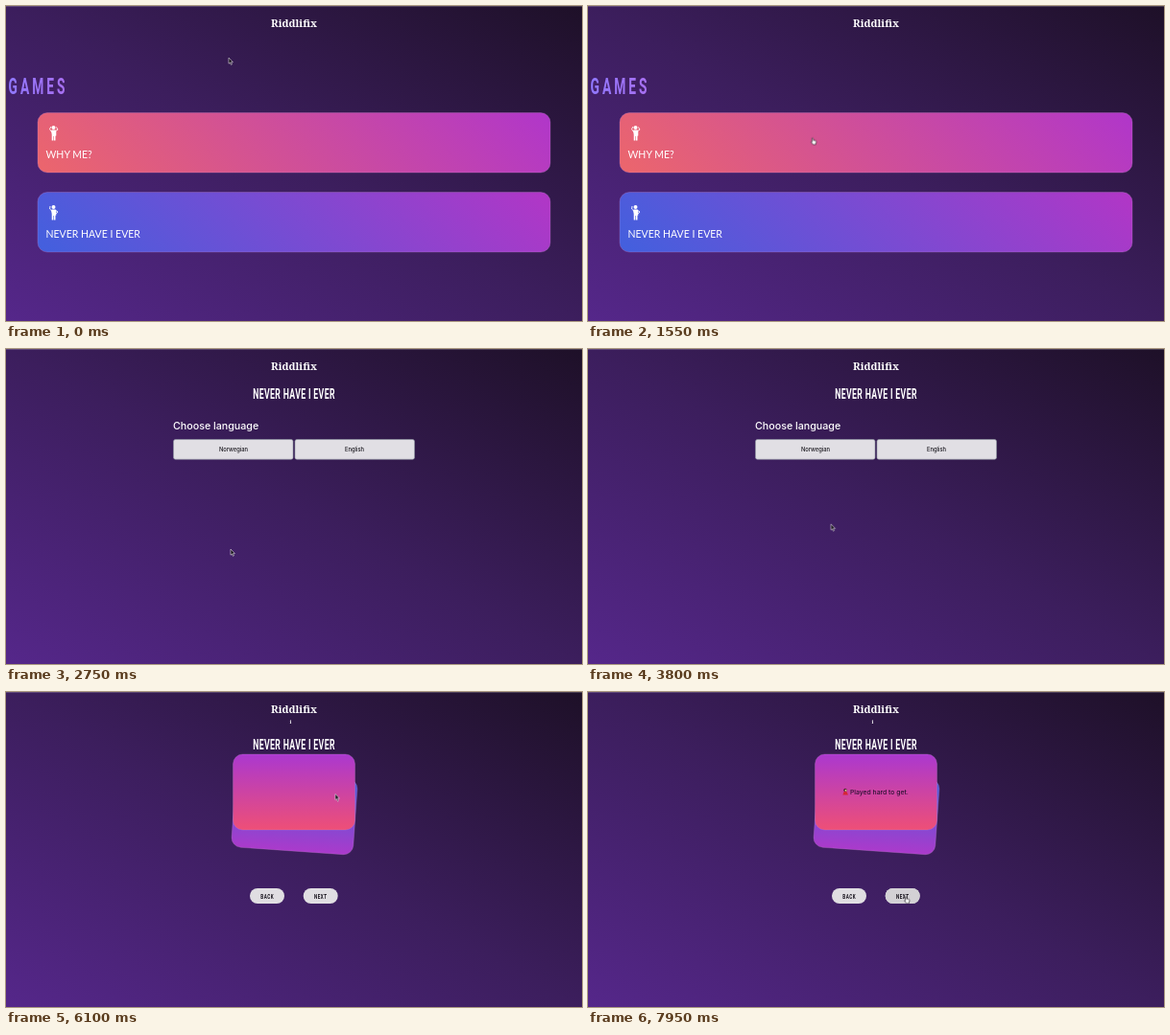
Recreate the animation shown at these times as an HTML page. Size 600 by 329 pixels, loop 8 s.

```html
<!DOCTYPE html>
<html lang="en">
<head>
<meta charset="utf-8">
<title>Party game</title>
<style>
  html, body { margin: 0; width: 100%; height: 100%; overflow: hidden; }
  body { background: linear-gradient(to top right, #55278a, #3c1e5d 50%, #1e1028); }
  svg { display: block; width: 100%; height: 100%; }

  .logo { font: 900 10.8px "Noto Serif", serif; fill: #fff; text-anchor: middle; }
  .tall { font-family: Roboto, sans-serif; font-weight: 700; transform: scaleX(.6); }
  .mid { text-anchor: middle; }
  .heading { font-size: 14.5px; letter-spacing: .6px; fill: #fff; }
  .games { font-size: 23px; letter-spacing: 5px; fill: url(#lilac); }
  .pill-label { font-size: 7.6px; letter-spacing: .8px; fill: #17131c; }
  .game { font: 400 10.5px Lato, sans-serif; fill: #fff; }
  .ask { font: 500 10.7px Inter, sans-serif; fill: #fff; }
  .choice { font: 500 5.8px Inter, sans-serif; fill: #1c1a20; text-anchor: middle; }
  .prompt { font: 500 6.8px Inter, sans-serif; fill: #2a1030; }
  .edge { stroke: #c58bd0; stroke-opacity: .55; stroke-width: .5; }
  .button { fill: #e1dfe4; stroke: #939aa5; stroke-width: .6; }
  .pill { fill: #e0dee2; }

  /* One 8 s timeline: 1% = 80 ms */
  .menu, .language, .play, .answer, .arrow, .hand, .hover-english, .hover-next {
    animation: 8s step-end infinite; visibility: hidden;
  }
  .menu { animation-name: menu; }
  .language { animation-name: language; }
  .play { animation-name: play; }
  .answer { animation-name: answer; }
  .hover-english { animation-name: hover-english; fill: #d3d1d7; }
  .hover-next { animation-name: hover-next; fill: #d3d1d5; }
  .arrow { animation-name: arrow; }
  .hand { animation-name: hand; }
  .pointer { animation: move 8s linear infinite; }

  @keyframes menu { 0% { visibility: visible } 32.5%, 100% { visibility: hidden } }
  @keyframes language { 0%, 72.5%, 100% { visibility: hidden } 32.5% { visibility: visible } }
  @keyframes play { 0% { visibility: hidden } 72.5%, 100% { visibility: visible } }
  @keyframes answer { 0% { visibility: hidden } 93.75%, 100% { visibility: visible } }
  @keyframes hover-english { 0%, 72.5%, 100% { visibility: hidden } 64.4% { visibility: visible } }
  @keyframes hover-next { 0% { visibility: hidden } 88%, 100% { visibility: visible } }
  @keyframes arrow {
    0%, 23.5%, 32.5%, 72.5% { visibility: visible }
    16.2%, 25.2%, 64.4%, 88%, 100% { visibility: hidden }
  }
  @keyframes hand {
    0%, 23.5%, 32.5%, 72.5% { visibility: hidden }
    16.2%, 25.2%, 64.4%, 88%, 100% { visibility: visible }
  }
  @keyframes move {
    0% { transform: translate(232px, 54px) }
    11.25% { transform: translate(231.5px, 83.5px) }
    21.25% { transform: translate(233px, 150px) }
    27.5%, 43% { transform: translate(234px, 209px) }
    53.5% { transform: translate(278.5px, 148px) }
    58.5%, 62% { transform: translate(330px, 115px) }
    68%, 79% { transform: translate(343px, 106.5px) }
    91%, 100% { transform: translate(330px, 213.5px) }
  }
</style>
</head>
<body>
<svg viewBox="0 0 600 329" preserveAspectRatio="none">
  <defs>
    <linearGradient id="lilac"><stop stop-color="#9078ff"/><stop offset="1" stop-color="#a86ff0"/></linearGradient>
    <linearGradient id="coral" gradientUnits="userSpaceOnUse" x1="118" y1="180" x2="416" y2="-118">
      <stop stop-color="#ec666c"/><stop offset="1" stop-color="#b036ca"/>
    </linearGradient>
    <linearGradient id="blue" gradientUnits="userSpaceOnUse" x1="118" y1="180" x2="416" y2="-118">
      <stop stop-color="#4260de"/><stop offset="1" stop-color="#b236c6"/>
    </linearGradient>
    <linearGradient id="front" x2="0" y2="1"><stop stop-color="#ab38cf"/><stop offset="1" stop-color="#ee4f77"/></linearGradient>
    <linearGradient id="back" x2="0" y2="1"><stop stop-color="#4361dd"/><stop offset="1" stop-color="#ab3acb"/></linearGradient>
    <rect id="card" width="534" height="62.5" rx="10" class="edge"/>
    <rect id="tile" x="-63.5" y="-39.5" width="127" height="79" rx="10" class="edge"/>
    <rect id="pill" width="36" height="16" rx="8"/>
    <g id="person" fill="#fff">
      <circle cx="4.5" cy="2.6" r="2"/>
      <path d="M2.6 5h4l.7 1v5l-.8.2V16H5V11.5h-.6V16H2.7V9.5L2 6Z"/>
    </g>
  </defs>

  <rect width="600" height="1" fill="#fff" opacity=".18"/>
  <text class="logo" x="300" y="22">Riddlifix</text>

  <g class="menu">
    <g transform="translate(2.5 91.5)"><text class="tall games">GAMES</text></g>
    <g transform="translate(33 111.5)">
      <use href="#card" fill="url(#coral)"/>
      <g transform="translate(12 13)">
        <use href="#person"/>
        <path d="M2.5 7 .5 4 2 1.5M6.7 6 9 4.6 7.5 2" fill="none" stroke="#fff" stroke-width=".9"/>
      </g>
      <text class="game" x="8.5" y="47.5">WHY ME?</text>
    </g>
    <g transform="translate(33 194.5)">
      <use href="#card" fill="url(#blue)"/>
      <g transform="translate(12 13)">
        <use href="#person"/>
        <path d="M2.7 6.5 .6 4.5 1 1.5M6.7 6 9 7.5 7.2 9.5" fill="none" stroke="#fff" stroke-width=".9"/>
      </g>
      <text class="game" x="8.5" y="47.5">NEVER HAVE I EVER</text>
    </g>
  </g>

  <g class="language">
    <g transform="translate(300 52)"><text class="tall mid heading">NEVER HAVE I EVER</text></g>
    <text class="ask" x="174" y="84">Choose language</text>
    <rect class="button" x="174.5" y="94.5" width="124.5" height="20.7" rx="2"/>
    <rect class="button" x="301" y="94.5" width="124.5" height="20.7" rx="2"/>
    <rect class="hover-english" x="301.3" y="94.8" width="123.9" height="20.1" rx="2"/>
    <text class="choice" x="237" y="106.5">Norwegian</text>
    <text class="choice" x="363" y="106.5">English</text>
  </g>

  <g class="play">
    <text x="296.5" y="32.5" font-family="Noto Serif, serif" font-weight="700" font-size="5" fill="#fff" text-anchor="middle">i</text>
    <g transform="translate(300 59.5)"><text class="tall mid heading">NEVER HAVE I EVER</text></g>
    <use href="#tile" fill="url(#back)" transform="translate(300.5 126.6) rotate(4)"/>
    <use href="#tile" fill="url(#front)" transform="translate(300 104.5)"/>
    <g class="answer">
      <circle cx="268" cy="102.4" r="1.7" fill="#3a2028"/>
      <circle cx="268.5" cy="102.8" r="1" fill="#f3c58f"/>
      <path d="M266.6 104h2.8l1.6 3.6h-5.6Z" fill="#d52636"/>
      <text class="prompt" x="273" y="106.5">Played hard to get.</text>
    </g>
    <use href="#pill" class="pill" x="254" y="205"/>
    <use href="#pill" class="pill" x="309.7" y="205"/>
    <use href="#pill" class="hover-next" x="309.7" y="205"/>
    <g transform="translate(272.2 215.7)"><text class="tall mid pill-label">BACK</text></g>
    <g transform="translate(327.8 215.7)"><text class="tall mid pill-label">NEXT</text></g>
  </g>

  <g class="pointer" stroke-linejoin="round">
    <path class="arrow" d="M0 0V6.2L1.4 5 2.4 7.3 3.4 6.9 2.5 4.6H4.4Z" fill="#151118" stroke="#e4e0e8" stroke-width=".6"/>
    <path class="hand" d="M.6.4Q1.3-.2 1.7.6L2 2.6 4.4 3.1Q5.1 3.3 5 4.2L4.4 7H1.6L-.5 4.4Q-.2 3.5.9 4.2Z" fill="#fff" stroke="#1a151e" stroke-width=".6"/>
  </g>
</svg>
</body>
</html>
```
